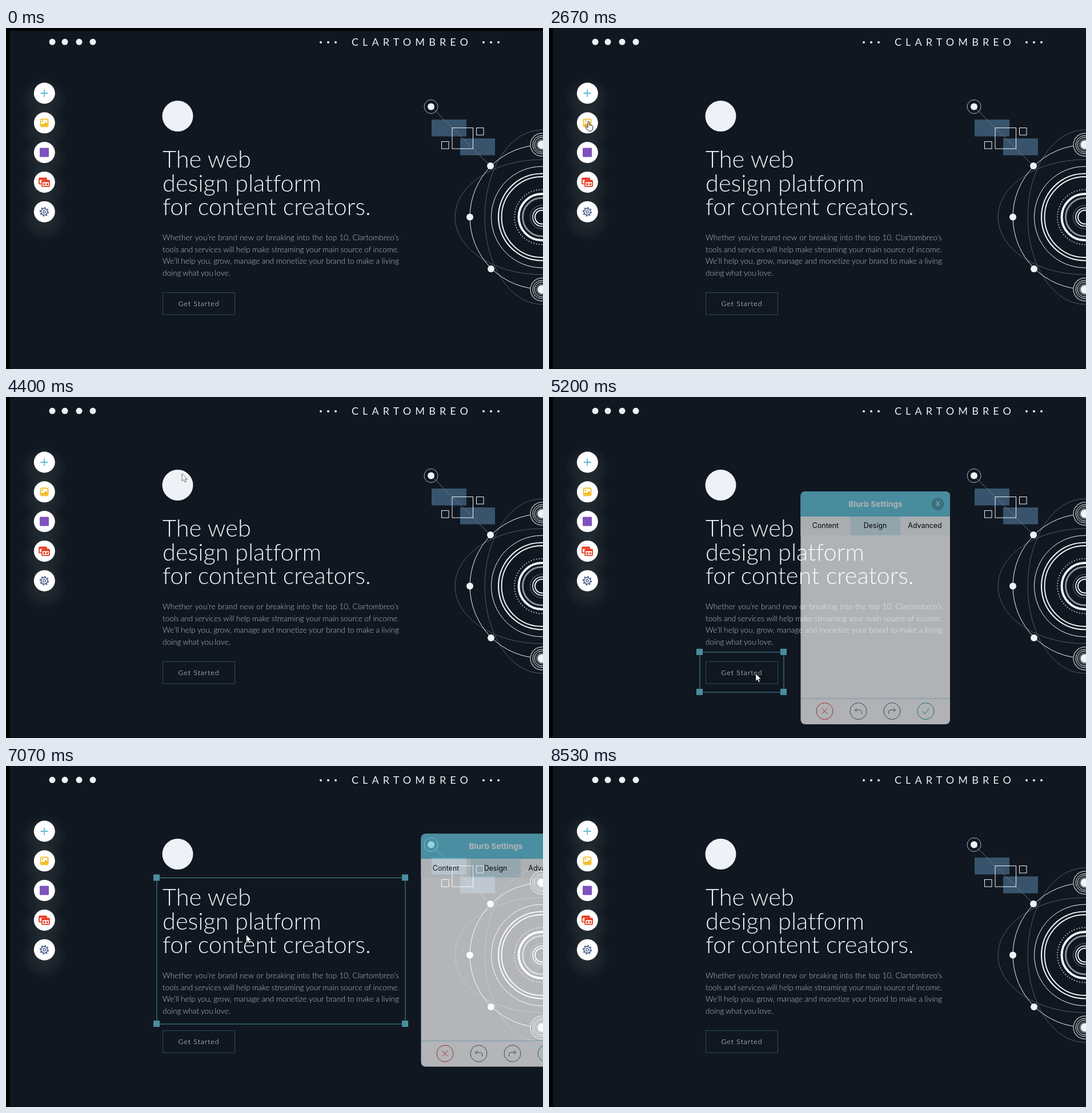
These frames come from a looping animation (940x596 px, 9140 ms). An HTML page:

```html
<!DOCTYPE html>
<html lang="en">
<head>
<meta charset="utf-8">
<title>Site editor demo</title>
<style>
html, body { margin: 0; width: 100%; height: 100%; overflow: hidden; background: #101720; }
svg { display: block; position: absolute; left: 0; top: 0; }
text { white-space: pre; font-variant-ligatures: none; }
.row { display: flex; justify-content: space-between; height: 20.7px; line-height: 20.7px;
  font: 300 13.6px/20.7px Lato, sans-serif; color: #bcc1c9; white-space: nowrap; font-variant-ligatures: none; }
.row.last { justify-content: flex-start; gap: 2.7px; }
</style>
</head>
<body>
<svg id="stage" width="940" height="596" viewBox="0 0 940 596" fill="none"></svg>
<script>
const LOOP = 9140;
const TEAL = '#66c6dd', YELLOW = '#f5c326', ICE = '#e4f8fe';
const UI = 'Inter, sans-serif', LATO = 'Lato, sans-serif', SERIF = "'Noto Serif', serif";

// Shape helpers
const attrs = o => Object.entries(o).map(([k, v]) => ` ${k}="${v}"`).join('');
const text = (x, cy, size, str, fill, o = {}) =>
  `<text x="${x}" y="${cy + size * 0.36}" font-size="${size}" fill="${fill}"${attrs({ 'font-family': UI, ...o })}>${str}</text>`;
const rect = (x, y, w, h, fill, r = 0, o = {}) =>
  `<rect x="${x}" y="${y}" width="${w}" height="${h}" rx="${r}" fill="${fill}"${attrs(o)}/>`;
const frame = (x, y, w, h, stroke, sw = 1) => rect(x, y, w, h, 'none', 0, { stroke, 'stroke-width': sw });
const dot = (x, y, r, fill) => `<circle cx="${x}" cy="${y}" r="${r}" fill="${fill}"/>`;
const ring = (x, y, r, stroke, sw = 1, o = {}) =>
  `<circle cx="${x}" cy="${y}" r="${r}" stroke="${stroke}" stroke-width="${sw}"${attrs(o)}/>`;
const path = (d, o) => `<path d="${d}"${attrs(o)}/>`;
const line = (d, stroke, sw = 1) => path(d, { stroke, 'stroke-width': sw });
const at = (x, y, body) => `<g transform="translate(${x} ${y})">${body}</g>`;
const group = (id, body, o = {}) => `<g id="${id}"${attrs(o)}>${body}</g>`;
const MID = { 'text-anchor': 'middle' };

// Icons, centred on 0,0
const plus = c => line('M-6.5 0H6.5M0 -6.5V6.5', c, 1.8);
const picture = c => rect(-6.5, -6.5, 13, 13, 'none', 2, { stroke: c, 'stroke-width': 1.8 }) +
  dot(-2.8, -2.8, 1.4, c) + path('M-5.5 5.5V3L-3 .8L-1 2.4L3 -1.8L5.5 1V5.5Z', { fill: c });
const cards = c => rect(-9, -7, 13, 10, '#fff', 1, { stroke: c, 'stroke-width': 1.8 }) +
  rect(-9, -7, 13, 3, c) + rect(-4, -3, 13, 10.5, '#fff', 1, { stroke: c, 'stroke-width': 1.8 }) +
  rect(-4, -3, 13, 3, c) + rect(-1.5, 2, 3.2, 3.2, c) + rect(3.6, 2, 3.2, 3.2, c);
const gear = c => ring(0, 0, 5.6, c, 1.6) + ring(0, 0, 2.2, c, 1.4) +
  ring(0, 0, 7.2, c, 2, { pathLength: 16, 'stroke-dasharray': '1 1' });

function page() {
  const headline = ['The web', 'design platform', 'for content creators.'];
  const copy = [
    'Whether you’re brand new or breaking into the top 10, Clartombreo’s',
    'tools and services will help make streaming your main source of income.',
    'We’ll help you, grow, manage and monetize your brand to make a living',
    'doing what you love.'];
  const rows = copy.map((s, i) => `<div class="row${i === 3 ? ' last' : ''}">` +
    s.split(' ').map(w => `<span>${w}</span>`).join('') + '</div>').join('');
  return rect(0, 0, 940, 596, '#101720') + rect(0, 0, 6.5, 596, '#000') +
    [81, 103, 128, 152].map(x => dot(x, 24.3, 5.5, '#eef1f5')).join('') +
    [551, 564, 577, 836, 849, 862].map(x => dot(x, 25, 2, '#eef1f5')).join('') +
    text(605, 24.7, 18, 'CLARTOMBREO', '#eef1f5', { 'font-family': LATO, 'letter-spacing': 7.1 }) +
    dot(300.5, 154, 27, '#eef1f5') +
    headline.map((s, i) => text(274, 229 + i * 41.6, 41.6, s, '#f0f3f7',
      { 'font-family': LATO, 'font-weight': 300 })).join('') +
    `<foreignObject x="274" y="356" width="414" height="86"><div xmlns="http://www.w3.org/1999/xhtml">${rows}</div></foreignObject>` +
    frame(274.5, 462.5, 126, 38.5, '#2c4a63') +
    text(337.5, 482, 12.3, 'Get Started', '#fff',
      { ...MID, 'font-family': LATO, 'font-weight': 300, 'letter-spacing': 1 });
}

function artwork() {
  const cx = 938, cy = 330.5, W = '#f0f3f7', G = '#525a64';
  const dots = (r, c, sw, n) => ring(0, 0, r, c, sw,
    { pathLength: n, 'stroke-dasharray': '0 1', 'stroke-linecap': 'round' });
  const moon = y => at(0, y, dot(0, 0, 21, '#101720') + dot(0, 0, 12, 'url(#halo)') + dot(0, 0, 7, W) +
    ring(0, 0, 13, W) + ring(0, 0, 16, W) + dots(20, W, 2, 44));
  const orbit = (rx, ry) => `<ellipse rx="${rx}" ry="${ry}" stroke="${G}"/>`;
  return at(cx, cy, orbit(152, 100.5) + orbit(100, 152.5) + ring(0, 0, 126, W) +
      ring(0, 0, 88.5, W) + ring(0, 0, 76, W, 2.2) + ring(0, 0, 70.5, W, 2) +
      dots(48, '#a9afb7', 2.2, 64) + ring(0, 0, 40.5, W, 4) + ring(0, 0, 33.5, '#8b929b', 3) +
      dots(20.5, '#a9afb7', 1.5, 44) + ring(0, 0, 16, W, 1.6) + ring(0, 0, 12, W, 2) +
      moon(-126.5) + moon(126.5)) +
    rect(745, 160, 61, 29.5, '#38546c') + rect(795, 193, 61, 29.5, '#38546c') +
    line('M744 137.5L848 241', '#6b7580') + ring(744, 137.5, 12, '#aab1b9') + dot(744, 137.5, 6, W) +
    frame(781, 174.5, 36.5, 36.5, W) + frame(823.5, 174.5, 12.5, 12.5, W) + frame(762.5, 198.5, 12.5, 12.5, W) +
    dot(848, 241, 6, W) + dot(812, 330.5, 6, W) + dot(849, 421, 6, W);
}

function sidebar() {
  const icons = [plus('#62bbd6'), picture('#f2b91f'), rect(-8, -8, 16, 16, '#7d52bd', 1),
    cards('#e8391f'), gear('#4f6690')];
  const ys = icons.map((_, i) => 114 + i * 51.8);
  const pill = (id, y, c, icon, label) => group(id, rect(49, y - 18.5, 37, 37, c, 18.5) +
    at(67, y, icon) + text(83, y, 11, label, '#fff', { class: 'label' }));
  return ys.map(y => dot(67, y + 11, 41, 'url(#glow)')).join('') +
    ys.map((y, i) => dot(67.3, y, 18.5, '#fff') + at(67, y, icons[i])).join('') +
    pill('addPill', ys[0], TEAL, plus('#fff'), 'Add') +
    pill('mediaPill', ys[1], YELLOW, picture('#fff'), 'Media');
}

const chip = (x, y, r, s, size, c = TEAL) => dot(x, y, r, ICE) + text(x, y, size, s, c, MID);

function preview() {
  const ink = '#151515', B = { 'font-weight': 700 }, S = { 'font-family': SERIF };
  const BS = { ...S, 'font-weight': 800 };
  const para = y => text(424, y, 5.6, 'I’m a paragraph. Click here to add your own', '#444') +
    text(424, y + 7.5, 5.6, 'text and edit me. It’s easy.', '#444');
  const section = (y, s) => text(422, y, 5.7, s, '#33475f') + ring(539.5, y + .5, 3.2, '#6aa6dc', .9) +
    line(`M422 ${y + 7}H543.5`, '#59636e', .8);
  return rect(364, 124, 49, 366, '#e7eef9') + rect(366, 128.5, 44, 11.5, '#c6e4f6', 5.7) +
    ['Themed Text', 'Titles', 'Paragraphs'].map((s, i) => text(371, 134 + i * 13, 5.2, s, '#223')).join('') +
    text(422, 132, 7.6, 'Add Text', '#5b6470') +
    dot(528.5, 132, 5, '#c2ecf7') + text(528.5, 132, 6, '?', '#3d8fa8', MID) +
    dot(542.5, 132, 5, '#c2ecf7') + text(542.5, 132, 5, 'x', '#3d8fa8', MID) +
    section(153, 'Themed Text') +
    text(424, 181, 13, 'Add Heading 1', ink, BS) + text(424, 204.5, 6.3, 'Add Heading 2', ink, B) +
    text(424, 224, 6.9, 'Add Heading 3', ink, BS) + text(424, 240, 8.1, 'Add Heading 4', ink, BS) +
    text(424, 255, 6.2, 'Add Heading 5', ink, BS) +
    text(424, 272.5, 6.8, 'Add Heading 6', ink, { ...S, 'font-style': 'italic' }) +
    para(287) + para(308) + para(328) + section(363.5, 'Titles') +
    text(422, 388, 16.5, 'Big Title', ink, { 'font-family': LATO }) +
    text(422, 409.5, 11, 'ALL CAPS TITLE', ink, { 'font-weight': 800, 'letter-spacing': 1.3 }) +
    text(422, 430, 8.6, 'Small Title', ink, { 'font-family': LATO }) +
    text(422, 450.5, 9.4, 'Business Title', ink, { ...S, 'letter-spacing': .7 }) +
    text(422, 472, 8.6, 'Story Title', ink, { ...BS, 'font-style': 'italic' }) +
    rect(424, 488.5, 4, 1, ink) + rect(446, 488.5, 8, 1, ink) + rect(468, 488.5, 3, 1, ink);
}

function addPanel() {
  const items = ['Text', 'Blocks', 'Image', 'Nav-Bars', 'Social Media', 'Video &amp; Music', 'Merch',
    'Icons &amp; Shapes', 'Contacts &amp; Forms', 'My designs', 'Dev Only'];
  return rect(90, 95.5, 20, 37, TEAL) + path('M102 142V132H92A9 9 0 0 1 100.5 142Z', { fill: TEAL }) +
    `<g clip-path="url(#addClip)">` + rect(100, 95, 134, 404, TEAL) +
    rect(234, 95, 118, 404, '#eff9fd') + rect(352, 95, 230, 404, '#fff') + '</g>' +
    rect(108, 103, 118, 29, '#52a8be', 14.5) +
    items.map((s, i) => text(116, 117.5 + i * 28.85, 10.6, s, '#f4fcff')).join('') +
    rect(241, 103, 103, 28, '#cdeef7', 14) +
    ['Themed Text', 'Titles', 'Paragraphs'].map((s, i) => text(249, 117 + i * 28.2, 10.3, s, '#0c0c0c')).join('') +
    chip(537, 111, 7.5, '?', 9.5, '#3a8fa8') + chip(559, 111, 7.5, 'X', 9.5, '#3a8fa8') + preview();
}

// Flat stand-ins for the six picture thumbnails, each 58 by 58
const thumbs = [
  ['#dfcfac', ['M0 26L16 17L30 22L44 8L58 14V58H0Z', '#b08d62'], ['M0 40L22 32L40 46L58 40V58H0Z', '#7b5532'], ['M24 40L36 36L44 44L30 48Z', '#e0c79d']],
  ['#3a2a20', ['M10 12H26Q24 18 32 26Q36 44 24 57H12Q0 44 4 26Q12 18 10 12Z', '#8ea5c4'], ['M5 28H32V38H4Z', '#34527f'], ['M38 18H52Q52 24 58 30V54H36Q30 40 38 28Z', '#556a8b']],
  ['#d5cba6', ['M0 8Q30 16 58 0V10Q30 26 0 18Z', '#8b9163'], ['M30 18Q50 30 30 46Q18 52 10 42Q30 44 30 18Z', '#b98a4a'], ['M0 46Q26 40 44 58H0Z', '#6d7a51']],
  ['#e9e6e2', ['M0 48L58 34V58H0Z', '#3a2b25'], ['M0 52L58 40V46L0 58Z', '#b98d6a'], ['M18 18L30 14L36 24L46 30L32 32L22 42L26 28Z', '#77716d']],
  ['#8fb6ee', ['M24 4L34 14L46 8L42 24L32 32L28 18Z', '#4646ad'], ['M4 36L16 40L24 52L10 48Z', '#5b8fd8'], ['M34 38L46 36L42 50Z', '#c98fae']],
  ['#77787a', ['M6 30Q12 10 30 10Q46 12 48 34L54 52H6Z', '#b1b1b0'], ['M10 30Q18 24 22 36L18 52H8Z', '#8f8f8f'], ['M0 48H58V58H0Z', '#4c4c4d']]
];

function mediaPanel() {
  const ink = '#1b1b1b';
  const sources = ['#3b5a9a', '#d23a78', '#ea4a3a', '#34a853'];
  const thumb = ([bg, ...shapes], i) => at([124, 191, 258.5][i % 3], i < 3 ? 299.5 : 364.5,
    `<g clip-path="url(#thumbClip)">` + rect(0, 0, 58, 58, bg) +
    shapes.map(([d, fill]) => path(d, { fill })).join('') + '</g>');
  return rect(85, 147.3, 25, 37, YELLOW) +
    path('M102 138V148H92A9 9 0 0 0 100.5 138ZM102 194V184H92A9 9 0 0 1 100.5 194Z', { fill: YELLOW }) +
    at(67, 165.8, picture('#fff')) +
    rect(100.5, 95.2, 40, 403.1, YELLOW, 8) +
    path('M109.5 95.2H323A8 8 0 0 1 331 103.2V490.3A8 8 0 0 1 323 498.3H109.5Z', { fill: '#fff' }) +
    text(124, 118, 14.5, 'Media', '#000', { 'font-weight': 700 }) +
    chip(287, 118, 7.5, '?', 9.5) + chip(309, 118, 7.5, 'X', 9.5) +
    text(124, 153, 9.4, 'What are you looking for?', ink) +
    rect(124, 166, 192, 22.5, '#f8f8f8', 11) + ring(136, 176.5, 2.6, '#2da58c', 1.3) +
    line('M138 178.5L140.5 181', '#2da58c', 1.4) +
    text(148, 177, 9.2, 'e.g. business, fashion, fitness', '#c2c2c2') +
    text(124, 216, 9.4, 'Upload your media', ink) + text(233, 212.5, 7.6, 'Jorvel Photo', ink) +
    dot(139, 244, 15, ICE) +
    line('M139 247V238M136 241L139 238L142 241M133.5 245V249.5H144.5V245', '#5fb5cf', 1.1) +
    sources.map((c, i) => ring(178.7 + i * 39.8, 244, 14.5, '#f0f0f0') + dot(178.7 + i * 39.8, 244, 7.5, c)).join('') +
    text(124, 287, 9.4, 'Site files', ink) + thumbs.map(thumb).join('') +
    rect(183, 435, 74, 20, ICE, 10) + text(220, 445, 9.5, 'Show more', '#4fb0cb', MID);
}

function settings() {
  const button = (x, c, d) => at(x, 549, ring(0, 0, 14.5, c) + line(d, c));
  const back = 'M-2.5 -5L-6 -1.8L-2.5 1.4M-6 -1.8H3Q6 -1.8 6 1.5V5';
  const fwd = 'M2.5 -5L6 -1.8L2.5 1.4M6 -1.8H-3Q-6 -1.8 -6 1.5V5';
  const tab = (x, s) => text(x, 225, 12.4, s, '#000', MID);
  return rect(440.5, 165, 261.5, 407, '#fff', 8) +
    path('M440.5 209V173A8 8 0 0 1 448.5 165H694A8 8 0 0 1 702 173V209Z', { fill: TEAL }) +
    text(571.5, 187, 13.6, 'Blurb Settings', '#fff', { ...MID, 'font-weight': 700 }) +
    dot(680.5, 187, 11, '#4c9db1') + text(680.5, 187, 12, 'X', '#fff', MID) +
    rect(440.5, 209, 261.5, 32.5, '#f6f9fa') + rect(527.5, 209, 87.5, 32.5, '#d2ebf2') +
    tab(484, 'Content') + tab(571, 'Design') + tab(658, 'Advanced') +
    line('M440.5 527H702', '#a9d3ea') +
    button(482.5, '#d8402c', 'M-5 -5L5 5M5 -5L-5 5') + button(541.5, '#56616f', back) +
    button(600.5, '#56616f', fwd) + button(659.5, '#1f9d84', 'M-6 0L-2 4.5L6 -4.5');
}

const selection = (x, y, w, h) => frame(x + .5, y + .5, w, h, TEAL) +
  [[x, y], [x + w, y], [x, y + h], [x + w, y + h]].map(([a, b]) => rect(a - 5.5, b - 5.5, 11, 11, TEAL)).join('');

const cursor = group('hand', path('M3 1.6C3 -.4 5.8 -.4 5.8 1.6V6.6L10.4 7.6C11.6 7.9 12 8.7 11.9 9.8L11.1 14C10.8 15.6 10 17 8.8 17H4.8C3.6 17 2.9 16.4 2.3 15.4L-.6 11C-1.4 9.5 .2 8.5 1.4 9.6L3 11Z',
  { fill: '#fff', stroke: '#111', 'stroke-width': 1, transform: 'translate(-3 0)' })) +
  group('arrow', path('M0 0V13L3 10.2L5.1 15L7.2 14L5.1 9.5H9.2Z', { fill: '#fff', stroke: '#111', 'stroke-width': .6 }));

const grad = (id, c, a) => `<radialGradient id="${id}"><stop offset=".35" stop-color="${c}" stop-opacity="${a}"/>` +
  `<stop offset="1" stop-color="${c}" stop-opacity="0"/></radialGradient>`;
const clip = (id, x, y, w, h, r) => `<clipPath id="${id}">${rect(x, y, w, h, '#fff', r)}</clipPath>`;

document.getElementById('stage').innerHTML =
  '<defs>' + grad('glow', '#c8dcc8', .09) + grad('halo', '#fff', .8) +
  clip('addClip', 100.5, 95.2, 480.5, 403.1, 8) + clip('thumbClip', 0, 0, 58, 58, 4) + '</defs>' +
  page() + artwork() + group('topBar', rect(0, 0, 940, 5, '#000')) + group('baseBar', rect(0, 595, 940, 1, '#080c12')) +
  sidebar() + group('add', addPanel()) + group('media', mediaPanel()) +
  group('blurb', selection(263.5, 445.5, 147, 70) + settings()) +
  group('blurb2', selection(263.5, 195, 435, 255.5) + at(286, -46.5, settings())) +
  group('cursor', cursor);

const el = id => document.getElementById(id);
const show = (id, a) => el(id).setAttribute('opacity', a);
const ramp = (t, a, b) => Math.min(1, Math.max(0, (t - a) / (b - a)));
const pulse = (t, a, b, c, d) => ramp(t, a, b) - ramp(t, c, d);
const ease = { io: p => p * p * (3 - 2 * p), out: p => 1 - (1 - p) ** 2, lin: p => p };

// Cursor moves: start, end, from, bend, to, easing
const moves = [
  [130, 1000, [930, 592], [520, 420], [69, 106], 'io'],
  [1700, 2270, [69, 106], [320, 170], [558, 108], 'io'],
  [2430, 2670, [558, 108], [320, 120], [68, 163], 'io'],
  [3410, 3870, [68, 163], [190, 150], [308, 118.5], 'io'],
  [4330, 4930, [308, 118.5], [310, 320], [362, 483.5], 'io'],
  [5330, 5870, [362, 483.5], [910, 390], [677, 183], 'io'],
  [6270, 6735, [677, 183], [540, 177], [420.5, 295], 'out'],
  [7220, 7530, [420.5, 295], [600, 400], [768, 500], 'io'],
  [8020, 8530, [768, 500], [440, 560], [105, 596], 'lin']
];
const handTimes = [[960, 4400], [6130, 6800], [7500, 8200]];

function cursorAt(t) {
  const [a, b, p, q, r, e] = moves.filter(m => m[0] <= t).pop() || moves[0];
  const s = ease[e](ramp(t, a, b)), u = 1 - s;
  return [0, 1].map(i => u * u * p[i] + 2 * u * s * q[i] + s * s * r[i]);
}

function pill(id, grow, label) {
  show(id, grow);
  el(id).querySelector('rect').setAttribute('width', 37 + 31 * grow);
  el(id).querySelector('.label').setAttribute('opacity', grow * label);
}

function render(t) {
  const add = pulse(t, 1420, 1630, 2440, 2670);
  const media = pulse(t, 3060, 3330, 4170, 4400);
  show('add', add);
  show('media', media);
  pill('addPill', pulse(t, 1020, 1130, 2470, 2670), t < 2000 ? 1 - add * .5 : 0);
  pill('mediaPill', pulse(t, 2960, 3090, 4170, 4400), t < 3330 ? 1 - media : 0);
  show('blurb', pulse(t, 5030, 5285, 6240, 6490));
  show('blurb2', pulse(t, 6890, 7155, 8040, 8290));
  show('topBar', t < 130 ? 1 : 0);
  show('baseBar', t < 130 ? 0 : 1);
  const [x, y] = cursorAt(t);
  const hand = handTimes.some(([a, b]) => t >= a && t < b);
  el('cursor').setAttribute('transform', `translate(${x.toFixed(2)} ${y.toFixed(2)})`);
  show('cursor', t >= 130 && t < 8530 ? 1 : 0);
  show('hand', hand ? 1 : 0);
  show('arrow', hand ? 0 : 1);
}

const start = performance.now();
function tick() {
  render((performance.now() - start) % LOOP);
  requestAnimationFrame(tick);
}
tick();
</script>
</body>
</html>
```
